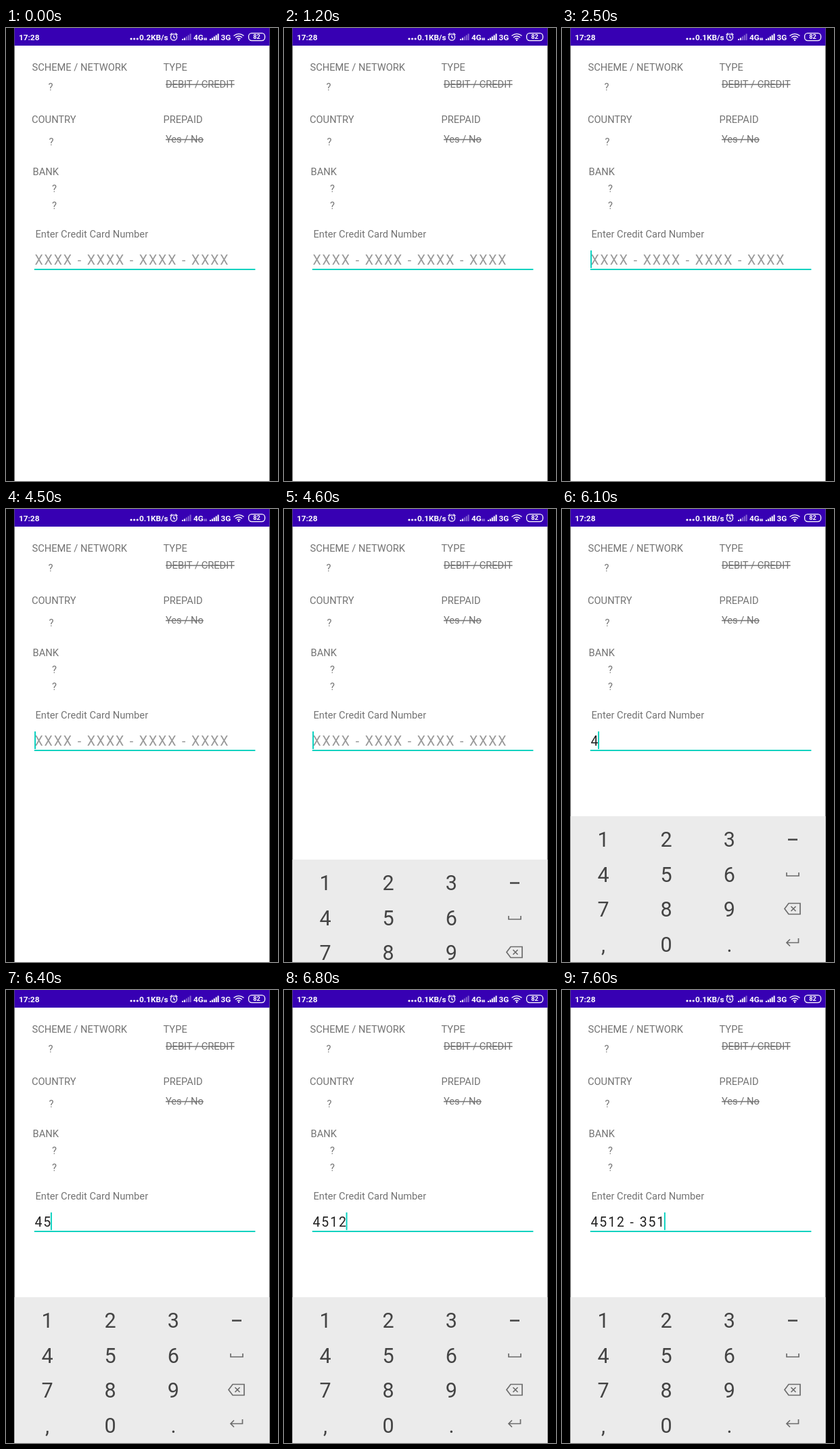
Recreate the animation shown at these times as an HTML page. Size 402 by 668 pixels, loop 8000 ms.

```html
<!DOCTYPE html>
<html lang="en">
<head>
<meta charset="utf-8">
<title>Card lookup</title>
<style>
html, body { margin: 0; height: 100%; overflow: hidden; background: #000; }
svg { display: block; font-family: Roboto, Arial, sans-serif; }
.label { font-size: 14.66px; fill: #737373; }
.strike { text-decoration: line-through; }
.entry { font-size: 19.4px; letter-spacing: 1.94px; }
.status { font-size: 11.8px; font-weight: 700; fill: #fff; }
.line { fill: none; stroke: #fff; stroke-width: 1.3; }
.digits { font-size: 30.5px; fill: #444; text-anchor: middle; }
.icon { fill: none; stroke: #6c6c6c; stroke-width: 1.7; }
</style>
</head>
<body>
<svg width="402" height="668" viewBox="0 0 402 668">
  <defs><clipPath id="screen"><rect x="12.5" width="377" height="668"/></clipPath></defs>
  <g clip-path="url(#screen)">
    <rect x="12" width="378" height="668" fill="#fff"/>
    <rect x="12" width="378" height="26" fill="#3700b3"/>

    <g class="status">
      <text x="19" y="17.5">17:28</text>
      <circle cx="185" cy="16" r="1.6"/><circle cx="189.6" cy="16" r="1.6"/><circle cx="194.2" cy="16" r="1.6"/>
      <text id="speed" x="197" y="17.5"></text>
      <g class="line">
        <circle cx="248" cy="13.5" r="4.6"/>
        <path d="M248 10.8v3l2 1M242.6 10.2l3-2.6M253.4 10.2l-3-2.6"/>
      </g>
      <g id="bars"></g>
      <text x="277" y="17.5">4G</text>
      <path id="arrows" d="M292.4 14.5h2.4v3.5h-2.4zM295.2 14.5h1.8v3.5h-1.8z"/>
      <text x="317.5" y="17.5">3G</text>
      <path class="line" d="M336.5 11.6q7.5-6 15 0M339 14q5-4 10 0M341.4 16.2q2.6-2 5.2 0"/>
      <circle cx="344" cy="17.7" r="1.2"/>
      <rect class="line" x="358.6" y="7.6" width="24" height="11" rx="4.5"/>
      <text x="370.6" y="16.4" font-size="9.3" text-anchor="middle" style="font-size:9.3px">82</text>
    </g>

    <g class="label">
      <text x="38.5" y="62.6">SCHEME / NETWORK</text>
      <text x="232.5" y="62.6">TYPE</text>
      <text x="62.5" y="92">?</text>
      <text x="236" y="88" class="strike">DEBIT / CREDIT</text>
      <text x="38" y="140">COUNTRY</text>
      <text x="232.5" y="140">PREPAID</text>
      <text x="63.5" y="173.4">?</text>
      <text x="236" y="169.2" class="strike">Yes / No</text>
      <text x="39.5" y="217.2">BANK</text>
      <text x="68" y="242.2">?</text>
      <text x="68" y="267.2">?</text>
      <text x="43.5" y="309">Enter Credit Card Number</text>
    </g>

    <text id="entry" class="entry" x="42.5" y="348.5"></text>
    <rect x="41.8" y="355" width="326.6" height="2" fill="#0cd2c0"/>
    <rect id="caret" y="328" width="2" height="26" fill="#0cd2c0"/>

    <g id="keyboard">
      <rect x="12" y="453" width="378" height="216" fill="#ebebeb"/>
      <rect id="press" width="93" height="51" fill="#dadada"/>
      <g id="digits" class="digits"></g>
      <g class="icon">
        <path d="M334 487.5h14" stroke="#444" stroke-width="2.6"/>
        <path d="M332 536v5h18v-5"/>
        <path d="M335 581.5h17v16h-17l-6-8zM338.5 586l7 7M345.5 586l-7 7"/>
        <path d="M349.5 633v6.5h-17M337 634.5l-5 5 5 5"/>
      </g>
    </g>
  </g>
</svg>
<script>
const LOOP = 8000, STEP = 100;
const HINT = 'XXXX - XXXX - XXXX - XXXX';
const TYPED = [[6000, '4'], [6300, '45'], [6600, '451'], [6800, '4512'],
  [7100, '4512 - 3'], [7400, '4512 - 35'], [7600, '4512 - 351']];
// [time, key] of the moments a key is held down
const PRESSES = [[5900, 4], [6200, 5], [6500, 1], [6700, 2], [7000, 3], [7500, 1]];
const $ = id => document.getElementById(id);
const show = (el, on) => el.setAttribute('visibility', on ? 'visible' : 'hidden');

function add(parent, tag, attrs, text = '') {
  const el = document.createElementNS('http://www.w3.org/2000/svg', tag);
  for (const k in attrs) el.setAttribute(k, attrs[k]);
  el.textContent = text;
  parent.append(el);
  return el;
}

[...'123456789,0.'].forEach((c, i) =>
  add($('digits'), 'text', { x: 61 + i % 3 * 93.2, y: 498.3 + Math.floor(i / 3) * 51.5 }, c));

const signal = x => [2, 3.5, 5.5, 7.5, 9.5].map((h, i) =>
  add($('bars'), 'rect', { x: x + i * 2.9, y: 18 - h, width: 2, height: h }));
const weak = signal(260);
signal(301);

function draw(t) {
  $('speed').textContent = t < 500 ? '0.2KB/s' : '0.1KB/s';
  $('arrows').setAttribute('opacity', t >= 2900 && t < 5900 ? 0.4 : 0.8);
  const lit = t < 7400 ? 2 : 4;
  weak.forEach((bar, i) => bar.setAttribute('opacity', i < lit ? 0.95 : 0.4));

  const last = TYPED.filter(([at]) => at <= t).pop();
  const entry = $('entry');
  entry.textContent = last ? last[1] : HINT;
  entry.setAttribute('fill', last ? '#202020' : '#999');
  const end = last ? 40.2 + entry.getComputedTextLength() : 42;
  $('caret').setAttribute('x', end);
  show($('caret'), t >= 5500 || Math.floor(t / 500) % 2);

  const p = Math.min(1, Math.max(0, (t - 4500) / 300));
  $('keyboard').setAttribute('transform', `translate(0 ${216 * (1 - p) ** 3})`);
  const press = PRESSES.find(([at]) => t >= at && t < at + STEP);
  show($('press'), press);
  if (press) {
    const k = press[1] - 1;
    $('press').setAttribute('x', 14.5 + k % 3 * 93.2);
    $('press').setAttribute('y', 461.5 + Math.floor(k / 3) * 51.5);
  }
}

const start = performance.now();
function tick() {
  const t = (performance.now() - start) % LOOP;
  draw(Math.floor(t / STEP) * STEP);
  requestAnimationFrame(tick);
}
tick();
</script>
</body>
</html>
```
